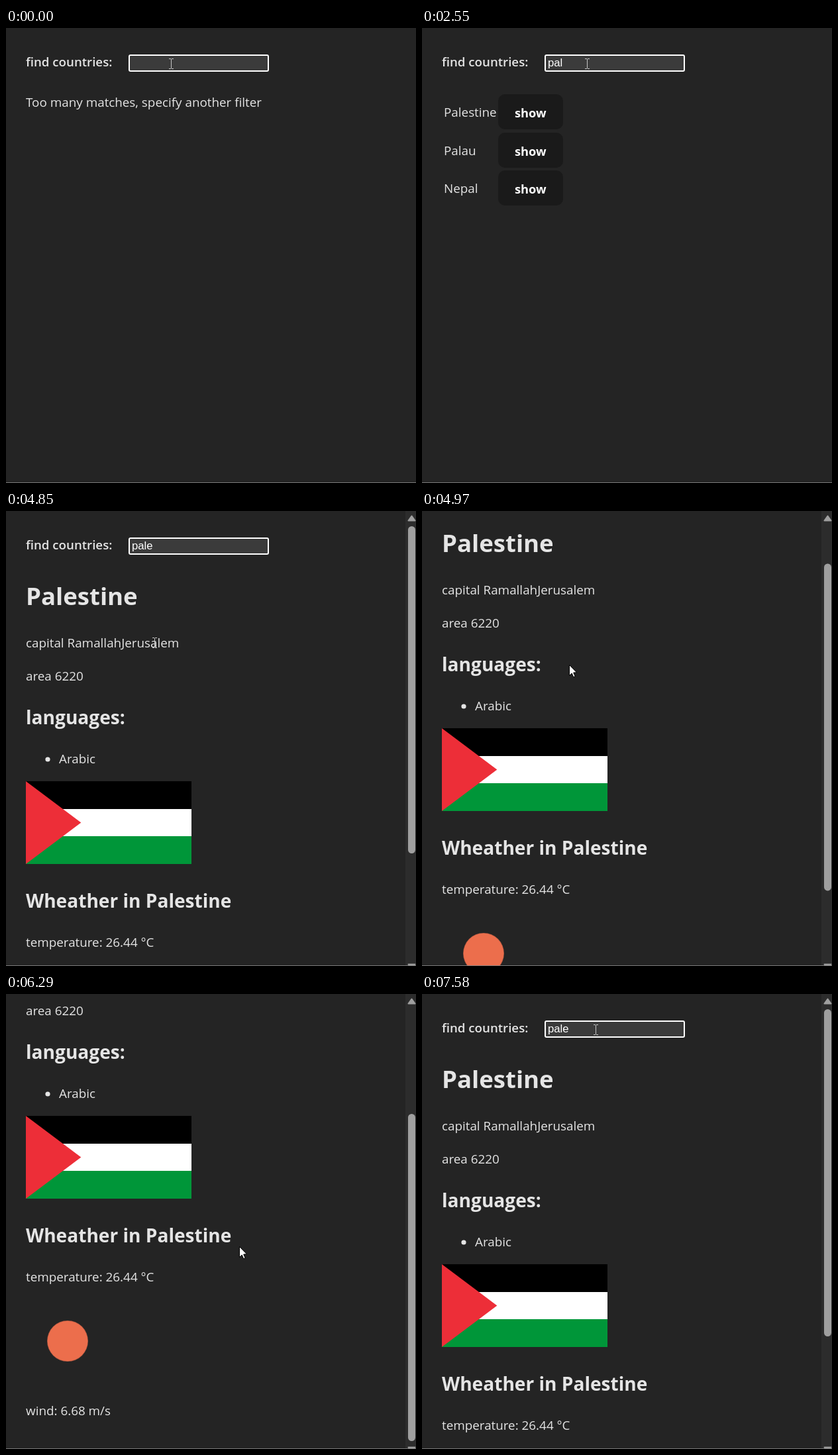
An HTML page with a canvas for the animation above (8000 ms loop, 619 by 687 pixels).

```html
<!DOCTYPE html>
<html lang="en">
<head>
<meta charset="utf-8">
<title>Country finder</title>
<style>
  html, body { margin: 0; width: 100%; height: 100%; overflow: hidden; background: #242424; }
  canvas { display: block; }
</style>
</head>
<body>
<canvas id="stage" width="619" height="687"></canvas>
<script>
const LOOP = 8000;
const ctx = document.getElementById('stage').getContext('2d');
const SANS = '"Open Sans", "Noto Sans", sans-serif';
const BODY = '400 18.83px ' + SANS;
const LABEL = '600 18.7px ' + SANS;
const BUTTON = '700 18.3px ' + SANS;
const H1 = '700 36.6px ' + SANS;
const H2 = '700 28.1px ' + SANS;
const INPUT = '16.67px "Liberation Sans", Arial, sans-serif';
const INK = '#e5e5e5', GREY = '#9f9f9f';

const MATCHES = ['Japan', 'Palestine', 'Spain', 'Panama', 'Papua New Guinea',
  'Palau', 'Paraguay', 'Pakistan', 'Nepal'];

// Tracks: [time, value...], each held until the next entry.
const TYPED = [[0, ''], [150, 'p'], [620, 'pa'], [1950, 'pal'], [3010, 'pale']];
const SCROLL = [[0, 0], [4970, 80], [5090, 190], [5210, 224], [6410, 100], [6530, 0]];
const MOUSE = [
  [0, 249, 54, 'beam'], [4490, 246, 72, 'arrow'], [4610, 240, 100, 'arrow'],
  [4730, 231, 150, 'arrow'], [4850, 224, 199, 'beam'], [4970, 222, 232, 'arrow'],
  [5090, 222, 245, 'arrow'], [5210, 222, 248, 'arrow'], [5330, 222, 256, 'arrow'],
  [5450, 222, 290, 'arrow'], [5570, 222, 335, 'arrow'], [5690, 222, 371, 'beam'],
  [5840, 222, 377, 'beam'], [5990, 303, 382, 'beam'], [6140, 351, 381, 'arrow'],
  [6290, 352, 381, 'arrow'], [6680, 355, 370, 'arrow'], [6800, 352, 300, 'arrow'],
  [6920, 335, 210, 'arrow'], [7040, 310, 130, 'arrow'], [7160, 285, 80, 'arrow'],
  [7280, 262, 54, 'beam']
];
const BLINKS = [150, 1080, 1680, 2550, 3010, 3460, 4060, 4610, 4970, 5570, 6050, 6530, 7040, 7580];

const at = (track, t) => track.findLast(key => key[0] <= t).slice(1);

function text(str, x, y, font = BODY, color = INK) {
  ctx.font = font;
  ctx.fillStyle = color;
  ctx.fillText(str, x, y);
}

function rect(x, y, w, h, color, radius = 0) {
  ctx.fillStyle = color;
  ctx.beginPath();
  ctx.roundRect(x, y, w, h, radius);
  ctx.fill();
}

function poly(color, ...points) {
  ctx.fillStyle = color;
  ctx.beginPath();
  points.forEach(([x, y]) => ctx.lineTo(x, y));
  ctx.closePath();
  ctx.fill();
}

function disc(x, y, r, color) {
  ctx.fillStyle = color;
  ctx.beginPath();
  ctx.arc(x, y, r, 0, 2 * Math.PI);
  ctx.fill();
}

function searchBox(typed, caret) {
  text('find countries:', 30, 58, LABEL);
  rect(185, 40, 212, 26, '#fff', 3);
  rect(187, 42, 208, 22, '#3b3b3b', 1);
  text(typed, 190, 58, INPUT, '#fff');
  if (caret) rect(Math.floor(190 + ctx.measureText(typed).width), 43, 1, 19, '#fff');
}

function list(names, buttonX) {
  names.forEach((name, i) => {
    const y = 100 + i * 57.5;
    text(name, 33, y + 34);
    rect(buttonX, Math.round(y), 98, 53, '#1a1a1a', 10);
    text('show', buttonX + 25, y + 35, BUTTON, '#fff');
  });
}

function flag(x, y) {
  ['#000', '#fff', '#009639'].forEach((color, i) => {
    const top = Math.round(i * 125 / 3);
    rect(x, y + top, 250, 125 - top, color);
  });
  poly('#ed2e38', [x, y], [x + 83.3, y + 62.5], [x, y + 125]);
}

function country(loaded) {
  text('Palestine', 30, 142, H1);
  text('capital RamallahJerusalem', 30, 206);
  text('area 6220', 30, 256);
  text('languages:', 30, 322, H2);
  disc(63, 375, 3.6, INK);
  text('Arabic', 80, 381);
  flag(30, 408);
  text('Wheather in Palestine', 30, 599, H2);
  text(`temperature: ${loaded ? '26.44 ' : ''}°C`, 30, 658);
  if (!loaded) return;
  disc(93, 748, 31, '#a8553f');
  disc(93, 748, 30.3, '#ec6e4c');
  text('wind: 6.68 m/s', 30, 860);
}

function scrollbar(scroll) {
  rect(603, 0, 16, 687, '#2c2c2c');
  ctx.strokeStyle = GREY;
  ctx.lineWidth = 2;
  ctx.lineJoin = 'round';
  poly(GREY, [612.5, 7.5], [617.5, 14.5], [607.5, 14.5]);
  ctx.stroke();
  poly(GREY, [607.5, 684.5], [617.5, 684.5], [612.5, 691.5]);
  ctx.stroke();
  rect(607, 23 + scroll * 158 / 224, 11, 494, GREY, 5.5);
}

function pointer(x, y, kind) {
  if (kind === 'beam') {
    const c = '#c4c4c4';
    rect(x, y - 7, 1, 14, c);
    for (const edge of [y - 8, y + 7]) {
      rect(x - 3, edge, 3, 1, c);
      rect(x + 1, edge, 3, 1, c);
    }
    return;
  }
  ctx.save();
  ctx.translate(x + 0.5, y + 0.5);
  poly('#fff', [0, 0], [0, 16], [3.7, 12.6], [6.2, 18.2], [8.7, 17.1], [6.2, 11.6], [11, 11.3]);
  ctx.strokeStyle = '#000';
  ctx.lineWidth = 1;
  ctx.stroke();
  ctx.restore();
}

function draw(t) {
  const [typed] = at(TYPED, t), [scroll] = at(SCROLL, t);
  const caret = BLINKS.filter(b => b <= t).length % 2 === 1;
  rect(0, 0, 619, 687, '#242424');
  ctx.save();
  ctx.translate(0, -scroll);
  searchBox(typed, caret);
  if (typed.length < 2) text('Too many matches, specify another filter', 30, 119);
  else if (typed === 'pale') country(t >= 3160);
  else list(MATCHES.filter(n => n.toLowerCase().includes(typed)), typed === 'pa' ? 204 : 115);
  ctx.restore();
  if (typed === 'pale') scrollbar(scroll);
  rect(0, 686, 619, 1, '#777');
  pointer(...at(MOUSE, t));
}

function tick() {
  draw(performance.now() % LOOP);
  requestAnimationFrame(tick);
}
tick();
</script>
</body>
</html>
```
